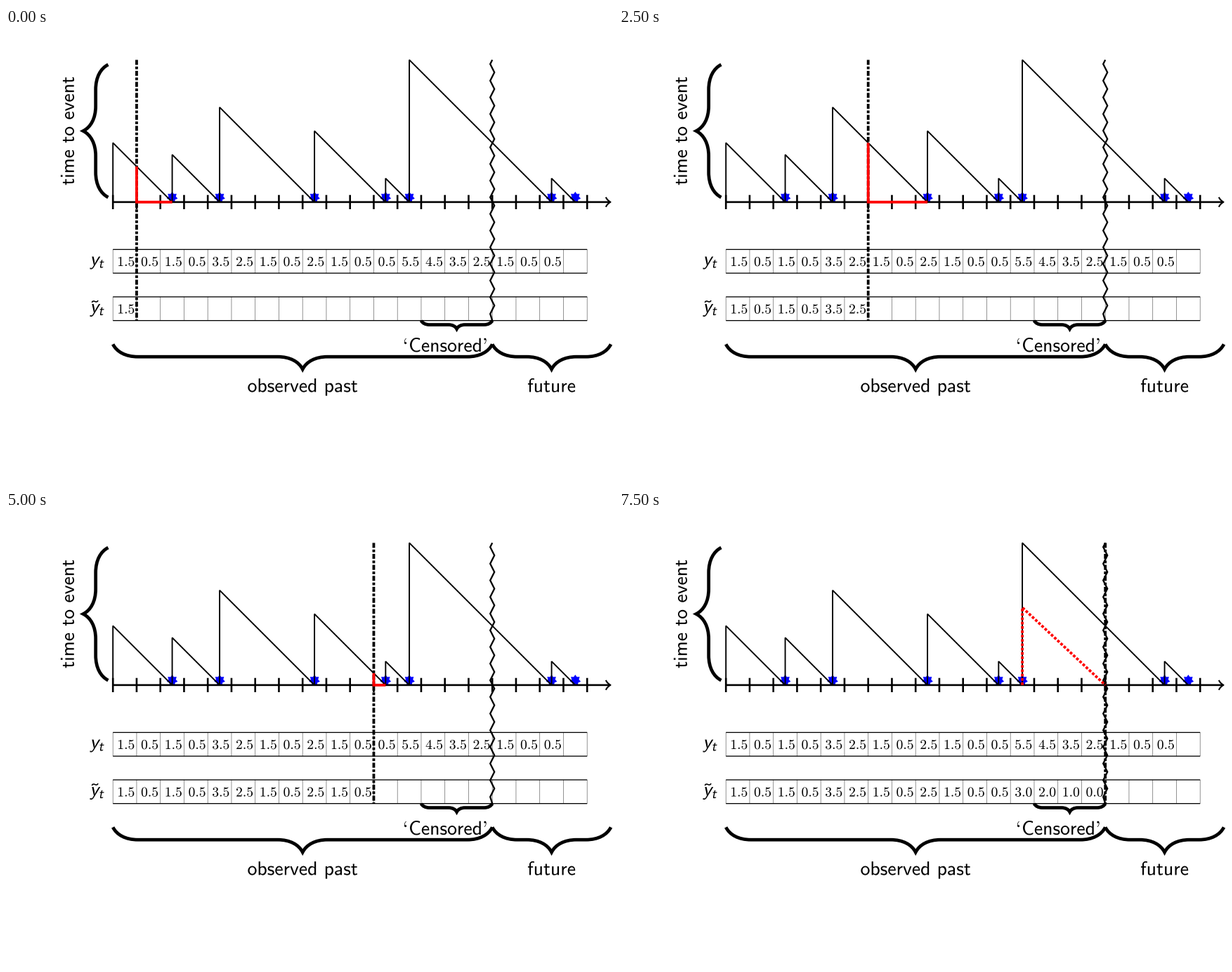
Write a matplotlib script that moves like this. It is 864 px wide and 648 px high and loops after 8000 ms.

```python
import math

import matplotlib.pyplot as plt
import numpy as np
from matplotlib.animation import FuncAnimation
from matplotlib.patches import PathPatch, Polygon
from matplotlib.path import Path
from matplotlib.textpath import TextPath
from matplotlib.transforms import Affine2D

plt.rcParams["mathtext.fontset"] = "cm"
plt.rcParams["path.snap"] = False

WIDTH, HEIGHT = 864, 648
UNIT, X0, Y0 = 33.75, 152.2, 247.9
EVENTS = [2.5, 4.5, 8.5, 11.5, 12.5, 18.5, 19.5]
NOW = 16          # end of the observed past
CENSOR_SLOPE = 0.935
PT = 2.372        # pixels per TeX point
BODY, SMALL = 27.7, 19.6

fig = plt.figure(figsize=(WIDTH / 72, HEIGHT / 72), dpi=72, facecolor="white")
ax = fig.add_axes([0, 0, 1, 1])
ax.set_xlim(0, WIDTH)
ax.set_ylim(HEIGHT, 0)
ax.axis("off")


def px(t):
    return X0 + UNIT * t


def py(h):
    return Y0 - UNIT * h


def line(ts, hs, width, color="black", z=3, **kw):
    """Polyline in chart units."""
    kw.setdefault("solid_capstyle", "butt")
    kw.setdefault("solid_joinstyle", "miter")
    return ax.plot([px(t) for t in ts], [py(h) for h in hs], color=color,
                   lw=width, zorder=z, **kw)[0]


def glyphs(text, size):
    return TextPath((0, 0), text, size=size)


def sans(text, size):
    return glyphs(r"$\mathsf{%s}$" % text.replace(" ", r"\hspace{0.38}"), size)


def place(path, x, y, angle=0, slant=0.0, z=5):
    """Put a glyph path with its origin at pixel (x, y)."""
    skew = Affine2D(np.array([[1, slant, 0], [0, 1, 0], [0, 0, 1]]))
    move = skew + Affine2D().rotate_deg(angle).scale(1, -1).translate(x, y)
    patch = PathPatch(path.transformed(move), fc="black", lw=0, zorder=z)
    return ax.add_patch(patch)


def centred(text, x, y, angle=0):
    path = sans(text, BODY)
    box = path.get_extents()
    mid = (box.x0 + box.x1) / 2
    a = math.radians(angle)
    place(path, x - mid * math.cos(a), y + mid * math.sin(a), angle)


def curve(points, codes, width, transform=Affine2D(), join="miter"):
    path = Path(points, codes).transformed(transform)
    ax.add_patch(PathPatch(path, fc="none", ec="black", lw=width, zorder=4,
                           capstyle="butt", joinstyle=join))


def brace(length, amp, transform):
    """Curly brace along +x, with its tip towards +y."""
    m, a = length / 2, amp
    half = [(0, 0), (.15 * a, .3 * a), (.5 * a, .5 * a), (a, .5 * a),
            (m - a, .5 * a), (m - .5 * a, .5 * a), (m - .15 * a, .7 * a), (m, a)]
    points = half + [(length - x, y) for x, y in half[-2::-1]]
    c, l = [Path.CURVE4] * 3, [Path.LINETO]
    curve(points, [Path.MOVETO] + c + l + c + c + l + c, 2 * PT, transform)


def draw_tables():
    for top in (-2, -4):
        for k in range(21):
            line([k, k], [top, top - 1], 0.7, "0.4", z=1)
        for h in (top, top - 1):
            line([0, 20], [h, h], 1.3, z=1)


def draw_chart():
    for e in EVENTS:
        r = [8 if i % 2 == 0 else 5.3 for i in range(14)]
        star = [(px(e) + r[i] * math.sin(i * math.pi / 7),
                 py(0.2) - r[i] * math.cos(i * math.pi / 7)) for i in range(14)]
        ax.add_patch(Polygon(star, fc="blue", lw=0, zorder=2))

    starts = [0] + EVENTS[:-1]
    ts = [t for pair in zip(starts, EVENTS) for t in pair]
    hs = [h for a, b in zip(starts, EVENTS) for h in (b - a, 0)]
    line([0] + ts, [0] + hs, 0.8 * PT)

    line([0, 20.97], [0, 0], 1.1 * PT)
    for k in range(21):
        line([k, k], [-0.3, 0.3], 1.1 * PT)
    tip = [(-6.5, -7), (-5.5, -3.5), (-1.5, -0.6), (0, 0),
           (-1.5, 0.6), (-5.5, 3.5), (-6.5, 7)]
    curve(tip, [Path.MOVETO] + [Path.CURVE4] * 6, 2.1,
          Affine2D().translate(px(21) - 0.5, Y0), "round")


def draw_zigzag():
    step, amp = 0.5 * 10 * PT / UNIT, 3 / UNIT
    hs = np.arange(6 - step / 2, -5, -step)
    ts = [NOW + (amp if i % 2 else -amp) for i in range(len(hs))]
    line([NOW, *ts, NOW], [6, *hs, -5], 2.3, z=4)


def draw_labels():
    centred("time to event", 97, py(3), 90)
    centred("observed past", px(8), 518.5)
    centred("future", px(18.5), 518.5)
    place(sans("Censored", BODY), 573.2, 461)
    comma = glyphs("$,$", BODY)
    place(comma, 678, 461 - 0.59 * BODY)
    place(comma, 572.5, 461 - 0.5 * BODY, 180)

    for base in (338, 405.5):
        place(sans("y", BODY), 119.3, base, slant=0.2126)
        place(sans("t", SMALL), 131.5, base + 3.6, slant=0.2126)
    tilde = [(122.3, 391), (124.5, 385.5), (128.5, 393.5), (131, 388)]
    curve(tilde, [Path.MOVETO] + [Path.CURVE4] * 3, 1.6)


def next_event(t):
    return next(e for e in EVENTS if e > t)


def number(value, cell, y):
    return place(sans(f"{value:.1f}", SMALL), px(cell) + 6.1, y)


draw_tables()
draw_chart()
draw_zigzag()
draw_labels()

amp = 15 * PT
brace(16 * UNIT, amp, Affine2D().translate(px(0), py(-6)))
brace(5 * UNIT, amp, Affine2D().translate(px(16), py(-6)))
brace(3 * UNIT, 5 * PT, Affine2D().translate(px(13), py(-5)))
brace(5.6 * UNIT, amp, Affine2D().rotate_deg(90).translate(px(-0.2), py(5.8)))

for t in range(1, 20):
    number(next_event(t) - t, t - 1, 339)
known = []
for t in range(1, NOW + 1):
    end = next_event(t)
    known.append(number(end - t if end < NOW else NOW - t, t - 1, 406.6))

lw = 1.6 * PT
cursor = line([1, 1], [6, -5], lw, z=6, dash_capstyle="butt",
              linestyle=(0, (3 * PT / lw, PT / lw, 1, PT / lw)))
censored = line([12.5, 12.5, NOW], [0, 3.5 * CENSOR_SLOPE, 0], lw, "red", z=7,
                dash_capstyle="butt", dash_joinstyle="miter",
                linestyle=(0, (1, PT / lw)))
corner = line([1, 1, 2], [1, 0, 0], lw, "red", z=8)


def update(frame):
    t = frame + 1
    end = min(next_event(t), NOW)
    height = (end - t) * (CENSOR_SLOPE if end == NOW else 1)
    cursor.set_xdata([px(t)] * 2)
    corner.set_data([px(t), px(t), px(end)], [py(height), py(0), py(0)])
    corner.set_visible(t < NOW)
    censored.set_visible(t > 12)
    for k, patch in enumerate(known):
        patch.set_visible(k < t)
    return [cursor, corner, censored, *known]


anim = FuncAnimation(fig, update, frames=NOW, interval=500, repeat=True,
                     repeat_delay=0, blit=False)
plt.show()
```
